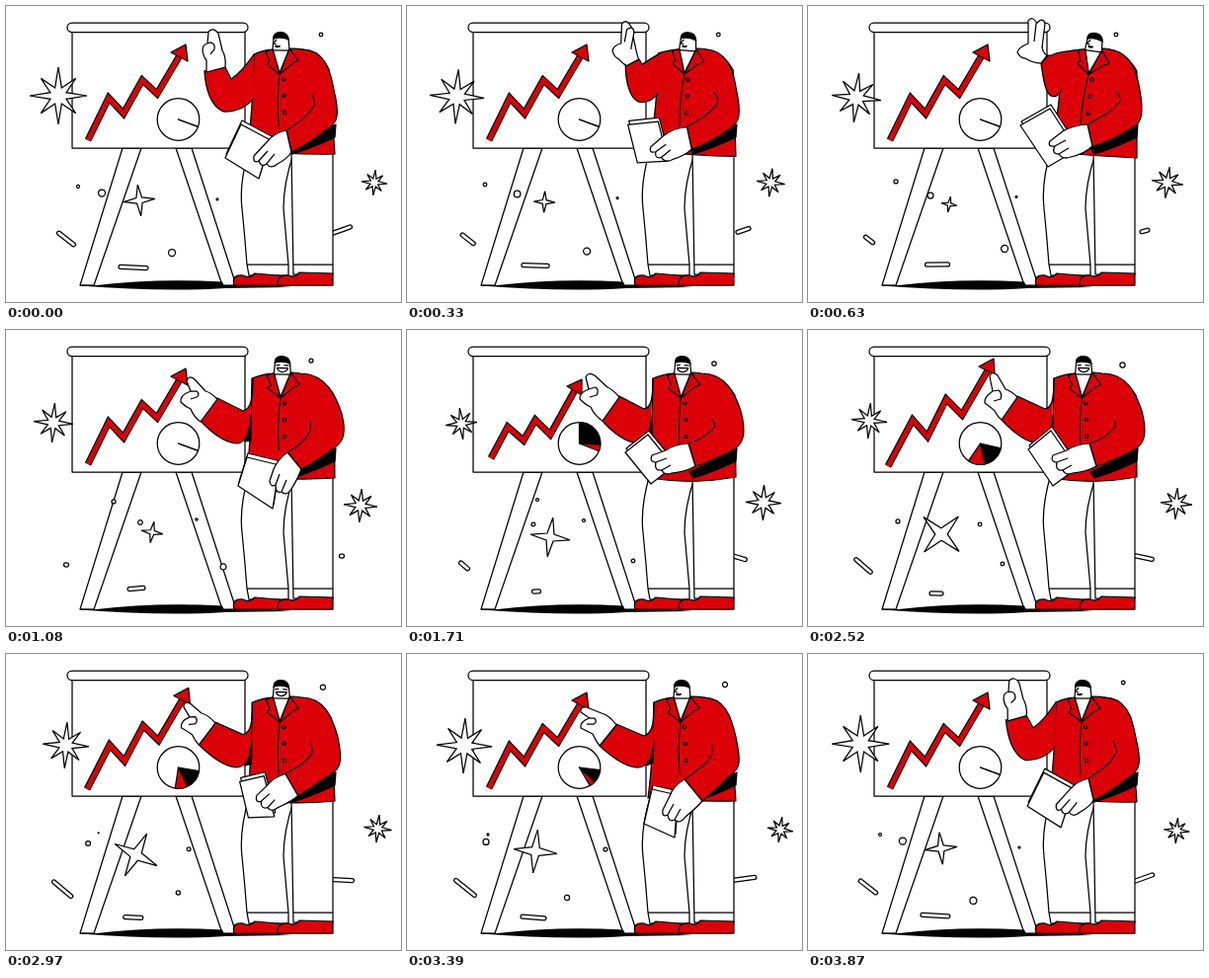
Animation, 400 px wide and 300 px high, one loop 3900 ms. Source, as an HTML page:

```html
<!DOCTYPE html>
<html lang="en">
<head>
<meta charset="utf-8">
<title>Presenter at a chart</title>
<style>
html, body { margin: 0; width: 100%; height: 100%; overflow: hidden; background: #fff; }
svg { display: block; width: 400px; height: 300px; fill: #fff; stroke: #000; stroke-width: 1.25; stroke-linejoin: round; }
.red { fill: #dc0008; }
.ink { fill: #000; }
.line { fill: none; }
</style>
</head>
<body>
<svg viewBox="0 0 400 300">
  <g id="easel">
    <path d="M118 144H137L89 283H75Z M172 144H188L233 283H219Z"/>
    <path class="ink" stroke="none" d="M75 282.5L92 283Q150 276 219 279.5L222 286Q160 290 75 283.5Z M220 283Q255 282 290 285L220 286Z"/>
    <rect x="67" y="22" width="175" height="122"/>
    <rect x="62" y="17" width="183" height="9.5" rx="4.7"/>
  </g>
  <g id="chart"><circle cx="174.5" cy="115" r="21.3"/></g>
  <g id="confetti"></g>
  <g id="legs">
    <path d="M246 146Q236 180 239 205Q242 235 244 262L246 273H286V262L281 205Q281 180 291 150Z"/>
    <path d="M289 148L291 272H331V148Z"/>
    <path class="line" d="M244 262H286M291 262H331"/>
    <path class="red" d="M231 283Q228 272 240 273Q246 277 252 271L286 274V283Z"/>
    <path class="red" d="M275 283Q274 272 286 273Q293 276 297 270L331 271V283Z"/>
  </g>
  <g id="body"></g>
  <g id="bust">
    <path d="M270 44L271 32Q271 27 278 27Q285 27 286 33L287 44L277 68Z"/>
    <path class="line" d="M270 45H287"/>
    <path class="ink" stroke="none" d="M270 34Q270 26 278 26Q286 26 287 35Q278 31 270 34Z"/>
    <g id="calm">
      <path class="line" d="M274 34L271 38L274 39"/>
      <path class="ink" stroke="none" d="M272 40H278Q278 43 273 42Z"/>
    </g>
    <g id="grin">
      <path class="line" d="M272 36L276 35.5M280 35.5L285 36"/>
      <path d="M273 38.5H284Q283 42.5 278 42.5Q274 42 273 38.5Z"/>
    </g>
    <path class="red" d="M270 44L263 46L267 56L264 59L277 69Z M287 43L296 55L290 58L277 69Z"/>
    <path class="line" d="M277 69Q274 90 276 122"/>
    <g class="red"><circle cx="281" cy="74" r="1.7"/><circle cx="281.5" cy="91" r="1.7"/><circle cx="282" cy="108" r="1.7"/></g>
  </g>
  <g id="limbs"></g>
</svg>
<script>
const LOOP = 3900, times = [0, 630, 1080, 1710, 2520, 3390];
const N = times.length, parts = [];
const $ = id => document.getElementById(id);
const timeOf = i => times[(i + N) % N] + Math.floor(i / N) * LOOP;

// Periodic cubic interpolation that rests at every extreme.
function ease(v, t) {
  const at = i => v[(i + N) % N];
  const rise = i => (at(i + 1) - at(i)) / (timeOf(i + 1) - timeOf(i));
  const slope = i => {
    const a = rise(i - 1), b = rise(i);
    return a * b <= 0 ? 0 : 2 * a * b / (a + b);
  };
  let i = N - 1;
  while (times[i] > t) i--;
  const h = timeOf(i + 1) - times[i], u = (t - times[i]) / h, w = 1 - u;
  return at(i) * w * w * (1 + 2 * u) + at(i + 1) * u * u * (3 - 2 * u)
    + h * u * w * (slope(i) * w - slope(i + 1) * u);
}

function add(parent, cls = "", attrs = {}) {
  const el = document.createElementNS("http://www.w3.org/2000/svg", "path");
  el.setAttribute("class", cls);
  for (const k in attrs) el.setAttribute(k, attrs[k]);
  return $(parent).appendChild(el);
}

// Each pose is a string; its numbers are blended and handed to draw.
function animate(poses, draw) {
  const rows = poses.map(p => p.match(/-?[\d.]+/g).map(Number));
  const cols = rows[0].map((_, i) => rows.map(r => r[i]));
  parts.push(t => draw(cols.map(c => ease(c, t))));
}

function morph(parent, cls, poses, attrs) {
  const el = add(parent, cls, attrs);
  animate(poses, n => {
    let i = 0;
    el.setAttribute("d", poses[0].replace(/-?[\d.]+/g, () => n[i++].toFixed(2)));
  });
}

const polar = (x, y, r, deg) => {
  const a = deg * Math.PI / 180;
  return (x + r * Math.cos(a)).toFixed(2) + " " + (y + r * Math.sin(a)).toFixed(2);
};

// Chart
const low = "M85 130L102 98L118 112L130 91L145 106L170 61";
const mid = "M83 136L104 93L119 109L138 75L153 89L176 50";
const high = "M81 138L106 91L121 108L140 70L156 86L182 41";
const trend = [mid, mid, mid, low, high, mid];
const sharp = { "stroke-linejoin": "miter" };
morph("chart", "line", trend, { ...sharp, "stroke-width": 7 });
morph("chart", "line", trend, { ...sharp, "stroke-width": 4.6, stroke: "#dc0008" });
const tip = "M182 39L167 47L184 56Z";
morph("chart", "red", [tip, tip, tip, "M177 50L162 57L177 66Z", "M188 29L173 37L189 45Z", tip]);

const slices = [add("chart", "ink"), add("chart", "red")];
animate(["20 20 20", "20 20 20", "20 20 20", "-90 3 21", "13 78 124", "7 43 60"], a => {
  slices.forEach((s, i) => s.setAttribute("d",
    `M174.5 115L${polar(174.5, 115, 21.3, a[i])}A21.3 21.3 0 0 1 ${polar(174.5, 115, 21.3, a[i + 1])}Z`));
});

// Confetti: star = x y radius turn, dot = x y radius, pill = x y length turn
function star(points, inner, poses) {
  const el = add("confetti", "", sharp);
  animate(poses, ([x, y, r, turn]) => {
    const pts = Array.from({ length: points * 2 }, (_, i) => {
      const size = i % 2 ? inner : points > 4 && i % 4 ? .86 : 1;
      return polar(x, y, r * size, turn + i * 180 / points);
    });
    el.setAttribute("d", "M" + pts.join("L") + "Z");
  });
}
function dot(poses) {
  const el = add("confetti");
  animate(poses, ([x, y, r]) => el.setAttribute("d",
    `M${x - r} ${y}a${r} ${r} 0 1 1 ${2 * r} 0a${r} ${r} 0 1 1 ${-2 * r} 0Z`));
}
function pill(poses) {
  const el = add("confetti");
  animate(poses, ([x, y, len, turn]) => {
    const s = Math.max(0, len - 4);
    el.setAttribute("d", `M${-s / 2} -2h${s}a2 2 0 0 1 0 4h${-s}a2 2 0 0 1 0 -4Z`);
    el.setAttribute("transform", `translate(${x} ${y})rotate(${turn})`);
  });
}
star(8, .3, ["53 91 29 0", "49 93 25 6", "48 94 20 4", "55 95 16 -6", "62 92 18 4", "58 93 28 2"]);
star(8, .32, ["373 179 13 5", "364 179 16 8", "359 178 17 4", "361 175 18 2", "373 176 16 4", "378 178 13 8"]);
star(4, .25, ["135 197 16 -6", "143 201 8 10", "148 205 11 10", "145 210 20 8", "135 207 25 44", "130 200 22 6"]);
dot(["97 189.5 3.5", "124 192 3", "136 195 2.3", "128 197 1.9", "91 194 2", "80 190.5 3"]);
dot(["73 183 1.5", "89 178 2", "109 174 2", "132 172 1.5", "108 178 .2", "82 183 1"]);
dot(["168 250 3.5", "199 246 3.5", "220 240 3", "229 234 1.8", "197 237 1.8", "162 247 2.6"]);
dot(["214 196 1", "211 193.5 1", "193 192 1.2", "179 193 1.5", "174 197 1.8", "201 198 2"]);
dot(["319 29 1.8", "312 29 1.8", "309 31 2", "311 34 2.2", "318.5 35.5 2.6", "322 31 2.5"]);
pill(["61 236 23 38", "62 237 13 38", "61 238 5 15", "58 239 13 40", "56 239 23 41", "59 237 28 39"]);
pill(["129 265 30 3", "131 262 25 0", "132 262 18 -5", "131 265 9 -3", "130 267 14 0", "128 267 26 4"]);
pill(["340 227 22 -20", "341 228 10 -15", "340 229 5 0", "337 231 15 17", "337 230 27 12", "340 228 28 -8"]);

// Jacket, with the head and lapels leaning over it
const jacket = "M249 49Q262 44 270 44L290 43Q318 45 332 66L333 149Q290 157 245 150Q248 110 249 49Z";
morph("body", "red", [
  "M251 49Q262 44 270 44L290 43Q316 43 327 64L333 150Q290 151 244 146Q250 110 251 49Z",
  "M257 47Q270 44 280 44L300 43Q322 45 333 66L333 154Q290 152 246 148Q256 100 257 47Z",
  "M249 49Q262 44 270 44L290 43Q318 45 332 66L333 150Q290 153 244 148Q248 110 249 49Z",
  jacket, jacket,
  "M250 49Q262 44 270 44L290 43Q316 43 327 64L333 149Q290 150 244 146Q249 110 250 49Z"]);
add("body", "ink", { d: "M334 120L333 133Q310 144 290 150L286 144Z" });
animate(["0", "8", "1", "0.5", "0.5", "0"], ([a]) => $("bust").setAttribute("transform", `rotate(${a} 278 120)`));
parts.push(t => {
  const smiling = t > 860 && t < 3000;
  $("grin").setAttribute("opacity", +smiling);
  $("calm").setAttribute("opacity", +!smiling);
});

// Pointing arm
const fold = "M248 86L242 113L248 112Z";
morph("limbs", "ink", ["M250 94L250 94L250 94Z", "M257 84L257 84L257 84Z", fold, fold, fold, "M250 88L243 113L249 110Z"]);
morph("limbs", "red", [
  "M251 49C242 62 234 70 228 74L222 62Q210 64 201 66C202 85 208 102 220 107C232 108 244 102 250 94",
  "M262 46C254 47 249 48 247 50L243 50Q239 55 236 58C238 72 240 88 246 91C250 93 254 91 257 84",
  "M250 49C250 70 248 80 240 82L214 69Q206 80 197 92C208 104 222 114 234 115C242 114 246 106 247 92",
  "M249 49C249 70 247 79 240 80L215 67Q207 79 198 92C208 104 222 114 234 115C242 114 246 106 247 92",
  "M249 49C249 70 247 79 240 80L212 67Q204 79 196 91C208 104 222 114 234 115C242 114 246 106 247 92",
  "M250 49C250 70 249 80 240 83L212 71Q204 82 195 93C208 105 222 115 234 115C243 114 248 106 249 94"]);
morph("limbs", "", [
  "M222 62Q223 52 219 45L215 28Q210 21 205 26L204 38Q199 39 199 45Q200 52 203 55Q203 62 203 67Z",
  "M242 50Q237 47 237 40L232 18Q227 9 223 15L223 38Q213 42 212 47Q215 53 220 53Q228 58 236 58Z",
  "M214 70Q207 63 202 62L191 50Q185 45 183 52L187 62Q176 66 177 73Q182 78 187 80Q190 88 197 93Z",
  "M215 68Q208 60 203 58L190 46Q183 42 181 48L184 60Q174 64 175 70Q181 76 186 78Q190 87 198 92Z",
  "M212 68Q206 62 200 60L192 46Q186 41 184 47L187 62Q178 68 179 74Q186 79 189 82Q192 88 196 91Z",
  "M212 72Q205 62 197 60L182 54Q175 53 176 59L185 65Q175 68 176 75Q184 79 188 81Q191 88 195 93Z"]);
morph("limbs", "", [
  "M204 38L207 37Q212 38 211 44L207 49",
  "M229 36L231 18Q238 10 240 18L237 42",
  "M187 62L193 62Q197 65 193 68L187 70",
  "M184 60L191 58Q195 61 192 66L185 68",
  "M187 62L193 61Q197 64 195 70L188 72",
  "M185 65L190 65Q193 69 189 71L182 71"]);

// Papers
const sheet = [
  "M238 120L268 136L256 175L222 154Z",
  "M215 121L245 104L272 146L243 163Z",
  "M244 129L277 137L270 181L235 158Z",
  "M221 124L244 106L270 138L247 156Z",
  "M223 121L246 102L272 140L248 158Z",
  "M248 137L274 143L271 186L240 172Z"];
morph("limbs", "", sheet, { transform: "translate(1 -4)" });
morph("limbs", "", sheet);

// Holding arm
const arm = "M300 44C323 45 332 64 338 82C344 105 341 116 329 122Q312 131 292 138L285 115C296 111 306 106 311 98Q312 95 309 90";
morph("limbs", "red", [
  "M300 44C321 44 328 62 332 85C338 110 336 118 326 124Q306 140 289 148L284 126C296 118 306 112 312 100Q313 96 309 88",
  "M305 44C326 46 333 66 336 85C340 108 338 118 330 122Q308 137 288 142L283 120C297 112 308 108 316 96Q316 92 312 86",
  "M301 44C324 46 334 66 340 85C345 105 342 114 330 121Q314 133 299 141L285 124C294 118 303 113 307 104Q309 100 308 92",
  arm, arm,
  "M300 44C321 44 328 62 333 84C338 108 338 116 328 122Q314 136 299 149L281 127C293 118 303 113 308 103Q310 99 308 90"]);
const grip = "M285 115Q270 116 262 122L248 127Q245 134 252 134Q250 143 258 142Q261 148 268 145Q282 144 292 138ZM252 134l11 -4M258 142l9 -5";
morph("limbs", "", [
  "M284 126Q272 128 264 138L251 152Q250 160 256 157Q258 164 264 160Q268 166 275 160Q286 154 289 148ZM256 157l9 -10M264 160l8 -10",
  "M283 120Q268 121 258 127L245 137Q242 143 250 142Q246 150 254 150Q258 156 266 153Q280 150 288 142ZM250 142l11 -6M254 150l10 -6",
  "M285 124Q276 130 271 141L267 153Q268 160 273 157Q273 166 279 164Q284 169 289 161Q296 150 299 141ZM273 157l4 -11M279 164l5 -12",
  grip, grip,
  "M281 127Q270 133 266 144L259 158Q258 166 264 163Q265 171 271 168Q276 173 282 165Q293 156 299 149ZM264 163l6 -11M271 168l6 -11"]);

const start = performance.now();
function frame() {
  const t = (performance.now() - start) % LOOP;
  parts.forEach(p => p(t));
  requestAnimationFrame(frame);
}
frame();
</script>
</body>
</html>
```
